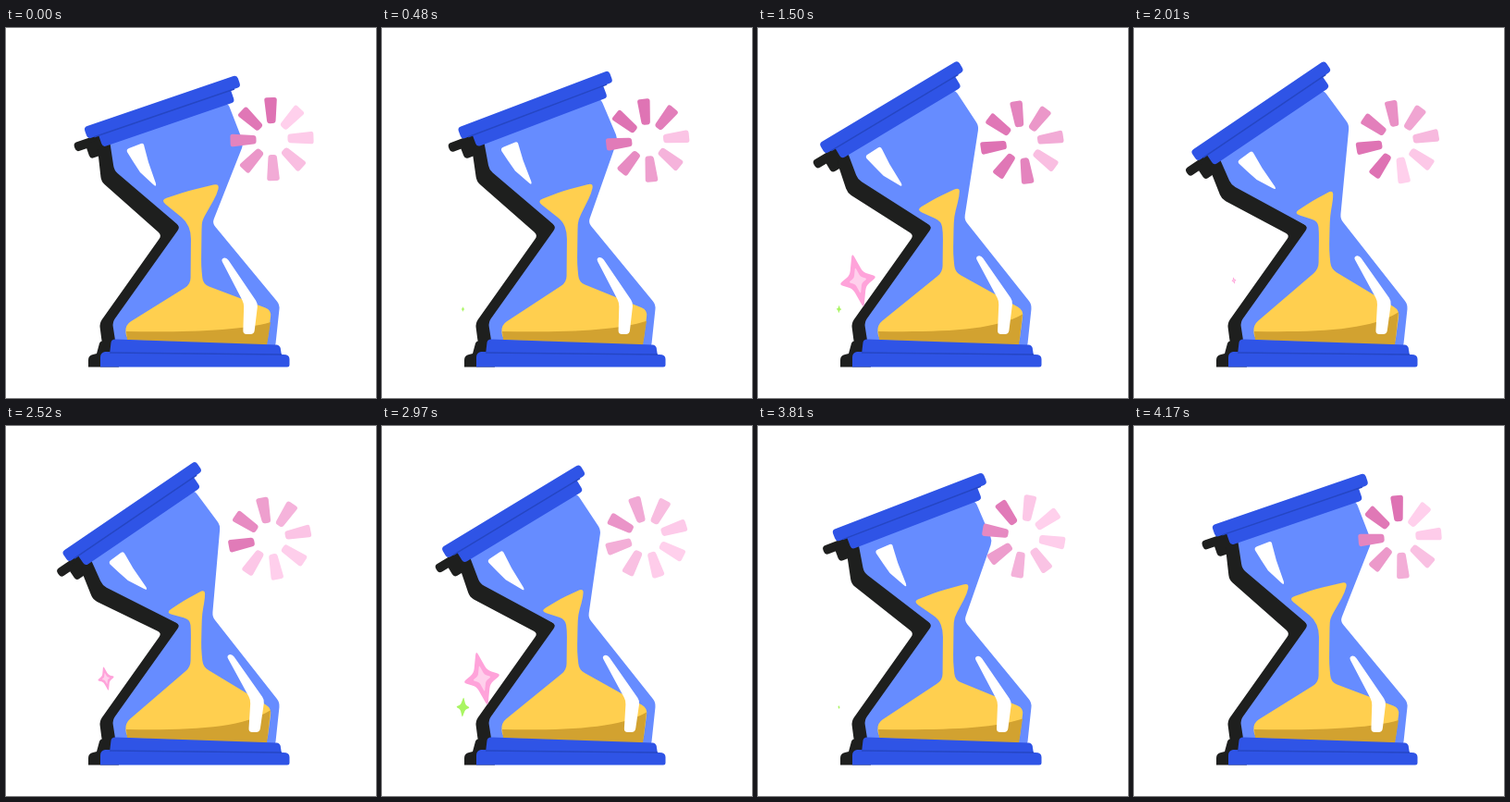
An HTML page that plays this animation: 400 px wide and 400 px high, repeating every 4200 ms.

```html
<!DOCTYPE html>
<html lang="en">
<head>
<meta charset="utf-8">
<title>Hourglass</title>
<style>
  html, body { margin: 0; width: 100%; height: 100%; overflow: hidden; background: #fff; }
  svg { display: block; width: 100vw; height: 100vh; }
</style>
</head>
<body>
<svg id="stage" viewBox="0 0 400 400">
  <g class="lid" fill="#1e1f1e">
    <g transform="translate(155 96.5) rotate(-18.85)">
      <rect x="-87" width="90" height="10" rx="4"/>
      <rect x="-75" y="5" width="78" height="17" rx="4"/>
    </g>
  </g>
  <path id="shadow" fill="#1e1f1e"/>
  <path fill="#1e1f1e" d="M89 366.5V359Q89 354 94 353L98 352L101 341Q102 338 106 338H122V366.5Z"/>
  <path id="glass" fill="#668cff"/>
  <path id="sand" fill="#ffcf4f"/>
  <path id="sandShade" fill="#d2a230"/>
  <path id="shine" fill="#fff"/>
  <g fill="#2f54e6">
    <path d="M112 353L113.500 340Q114 336.500 118 336.500L293 342.500Q297 343.500 297 348L298 354Z"/>
    <path d="M102 366.500V356Q102 351 107 350L300 353Q306.500 353 306.500 358V364Q306.500 366.500 304 366.500Z"/>
    <path d="M112 351L298 353" stroke="#2546c4" stroke-width="1.5"/>
  </g>
  <g class="lid">
    <path fill="#fff" d="M133 130L146 125Q149 124 149.500 128L154 145L162 168Q163 173 159 169L145 156Q137 144 131 134Q130 131 133 130Z"/>
    <g transform="translate(167 79.5) rotate(-18.85)" fill="#2f54e6">
      <rect x="-75" y="5" width="151" height="21.500" rx="4"/>
      <rect x="-87.500" y="-.5" width="175" height="13.500" rx="4"/>
      <path d="M-80 13H80" stroke="#2546c4" stroke-width="1.5"/>
    </g>
  </g>
  <g id="spinner"></g>
  <g id="pinkStar">
    <path class="star" fill="#ffa3da"/>
    <path class="star" fill="#ffd0ec" transform="scale(.48)"/>
  </g>
  <path id="greenStar" class="star" fill="#a9f562"/>
</svg>
<script>
const PERIOD = 4200, STEP = 30, TAU = Math.PI * 2;
const RAYS = 8, MAX_BEND = 15.75, PIVOT = [171, 207], NECK = [205, 212];
const $ = id => document.getElementById(id);
const all = selector => document.querySelectorAll(selector);
const mix = (a, b, k) => a + (b - a) * k;

function turn([x, y], [cx, cy], degrees, scale = 1) {
  const a = degrees * TAU / 360, c = Math.cos(a) * scale, s = Math.sin(a) * scale;
  return [cx + (x - cx) * c - (y - cy) * s, cy + (x - cx) * s + (y - cy) * c];
}

function roundedPath(points, radius) {
  const n = points.length;
  const toward = (p, q) => {
    const k = Math.min(radius / Math.hypot(q[0] - p[0], q[1] - p[1]), .5);
    return [mix(p[0], q[0], k), mix(p[1], q[1], k)];
  };
  return points.map((p, i) => {
    const start = toward(p, points[(i + n - 1) % n]), end = toward(p, points[(i + 1) % n]);
    return `${i ? 'L' : 'M'}${start}Q${p} ${end}`;
  }).join('') + 'Z';
}

const setPath = (id, points, radius) => $(id).setAttribute('d', roundedPath(points, radius));

function place(id, x, y, angle, scale = 1) {
  $(id).setAttribute('transform', `translate(${x} ${y}) rotate(${angle}) scale(${scale})`);
}

const rays = Array.from({ length: RAYS }, (_, i) => {
  const ray = document.createElementNS('http://www.w3.org/2000/svg', 'path');
  ray.setAttribute('d', roundedPath([[17, -4.5], [45, -7], [45, 7], [17, 4.5]], 3));
  ray.setAttribute('transform', `rotate(${-90 - 360 / RAYS * i})`);
  return $('spinner').appendChild(ray);
});

const starPoints = Array.from({ length: 8 }, (_, i) => {
  const a = i * TAU / 8, r = i % 2 ? 10.5 : i % 4 ? 31 : 21.5;
  return [r * Math.cos(a), r * Math.sin(a)];
});
all('.star').forEach(star => star.setAttribute('d', roundedPath(starPoints, 5)));

const pulse = (t, start, length) =>
  t > start && t < start + length ? Math.sin(Math.PI * (t - start) / length) : 0;

function drawHourglass(a) {
  // The fall back lags a little behind a pure cosine.
  const bend = (1 - Math.cos(a - .17 + .17 * Math.cos(a - 1.05))) / 2;
  const angle = -MAX_BEND * bend, dx = Math.sin(a), dy = -3.7 * Math.sin(a);
  const lid = (x, y) => {
    const [px, py] = turn([x, y], PIVOT, angle);
    return [px + dx, py + dy];
  };
  all('.lid').forEach(g =>
    g.setAttribute('transform', `translate(${dx} ${dy}) rotate(${angle} ${PIVOT})`));

  setPath('shadow', [
    lid(112, 120), lid(99, 130), lid(103, 166), [168.5, 224], [101, 319], [104, 342],
    [121, 342], [119, 318], [189, 215], lid(122, 154)], 5);
  setPath('glass', [
    lid(112, 121), lid(117, 154), [188.5, 215], [115, 318], [119, 344],
    [291, 346], [296, 299], [223, mix(211, 206, bend)], lid(257, 125), lid(240, 81)], 5);

  // The upper sand shrinks toward the neck while the heap rises.
  const pile = (x, y) => {
    const [px, py] = turn([x, y], NECK, angle, mix(1, .74, bend));
    return [px, py + dy / 2];
  };
  const heapTop = mix(277, 260, bend);
  setPath('sand', [
    pile(167, 186), pile(197, 176), pile(231, 168), pile(228, 180), [212, mix(208, 203, bend)],
    [211.5, 217], [211, heapTop - 20], [213, heapTop], [287, 305], [282, 343], [130, 337],
    [129, 321], [199.5, heapTop], [200, 221], [mix(195, 199, bend), 209]], 7);
  $('sandShade').setAttribute('d',
    `M130 328C200 329 255 327 286 ${mix(318, 307, bend)}L282 343L131 337Z`);

  const sx = 4 * (1 - Math.cos(a - .67)) - .6, sy = -1.5 - 1.5 * Math.cos(a - 2.6);
  const glint = (x, y, follow = 1) => [x + sx * follow, y + sy * follow];
  setPath('shine', [
    glint(232, 250, .85), glint(238, 248, .85), glint(272, 298),
    [268 + sx * .85, 331], [256 + sx * .85, 331], glint(257, 298)], 4);
}

function drawSpinner(a) {
  place('spinner', 286.2 + 1.3 * Math.cos(a), 121.5 - 2.2 * Math.cos(a + .87), a * 360 / TAU - 2);
  rays.forEach((ray, i) => {
    const dark = (1 + Math.cos(a - TAU * i / 14)) / 2;
    ray.setAttribute('fill', `rgb(${mix(255, 222, dark)},${mix(208, 114, dark)},${mix(236, 179, dark)})`);
  });
}

function draw(t) {
  const a = t / PERIOD * TAU;
  drawHourglass(a);
  drawSpinner(a);
  place('pinkStar', 108, 273, 78, pulse(t, 850, 1210) + pulse(t, 2340, 1210));
  place('greenStar', 87.5, 304, 94, .48 * (pulse(t, 400, 1220) + .9 * pulse(t, 2560, 1320)));
}

// Long axis of the star lies across its own x axis, so the stars stand nearly upright.
starPoints.forEach((p, i) => { starPoints[i] = [-p[1], p[0]]; });
all('.star').forEach(star => star.setAttribute('d', roundedPath(starPoints, 5)));

const began = performance.now();
function tick() {
  const t = (performance.now() - began) % PERIOD;
  draw(Math.floor(t / STEP) * STEP);
  requestAnimationFrame(tick);
}
tick();
</script>
</body>
</html>
```
